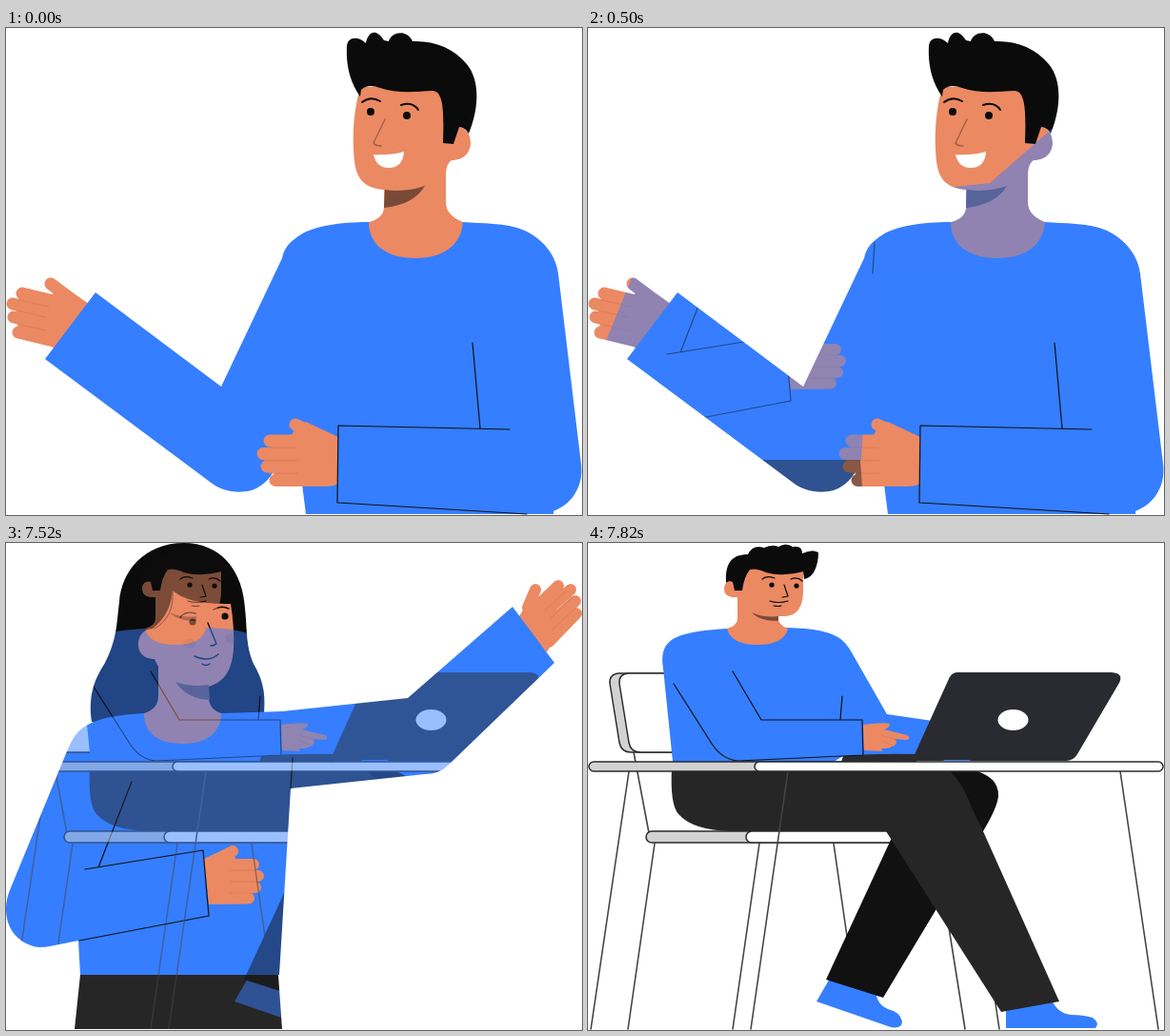
An HTML page with a canvas that plays this animation: 605x512 px, repeating every 8 s.

```html
<!DOCTYPE html>
<html lang="en">
<head>
<meta charset="utf-8">
<title>Three people</title>
<style>
html, body { margin: 0; width: 100%; height: 100%; overflow: hidden; background: #fff; }
canvas { display: block; }
</style>
</head>
<body>
<canvas id="stage" width="605" height="512"></canvas>
<script>
const W = 605, H = 512;
const SKIN = '#eb8963', CREASE = '#de7d5a', SHADE = '#794a38', BLUE = '#357eff';
const BLACK = '#0b0b0b', PANTS = '#262626', INK = '#111', GREY = '#d2d2d2', FRAME = '#444';
const stage = document.getElementById('stage').getContext('2d');
let g;

function layer(draw) {
  const c = document.createElement('canvas');
  c.width = W;
  c.height = H;
  g = c.getContext('2d');
  g.lineCap = g.lineJoin = 'round';
  draw();
  return c;
}

function fill(d, color) {
  g.fillStyle = color;
  g.fill(new Path2D(d));
}

function line(d, color = INK, width = 1.2) {
  g.strokeStyle = color;
  g.lineWidth = width;
  g.stroke(new Path2D(d));
}

function oval(x, y, rx, ry, color) {
  g.fillStyle = color;
  g.beginPath();
  g.ellipse(x, y, rx, ry, 0, 0, 7);
  g.fill();
}

function dot(x, y, r, color = BLACK) {
  oval(x, y, r, r, color);
}

// Palm, round-ended fingers and the creases between them
function hand(palm, fingers, width, creases) {
  fill(palm, SKIN);
  line(fingers, SKIN, width);
  line(creases, CREASE, 1);
}

// Outlined bar with rounded ends
function bar(x, y, w, h, color) {
  g.beginPath();
  g.roundRect(x, y, w, h, h / 2);
  g.fillStyle = color;
  g.strokeStyle = '#2b2b2b';
  g.lineWidth = 1.5;
  g.fill();
  g.stroke();
}

const waving = layer(() => {
  hand('M46 281L62 273L90 292L52 338L40 329L15 321L12 312L10 300L12 290L20 282Z',
    'M47 269L75 290M17 279L50 287M7 290L45 298M8 304L45 312M13 320L50 329', 13,
    'M14 286L45 293M12 297L42 304M15 312L42 318');
  fill('M381 204C350 204 325 208 310 217C297 225 292 232 290 242L226 377L94 278L41 348L214 477C226 487 243 490 258 486Q270 482 278 471L304 425L315 511H575V508C596 500 607 480 604 458L580 258C577 235 560 220 545 213C524 204 500 206 480 204Z', BLUE);
  fill('M372 62C366 85 364 105 365 128C366 150 369 168 397 170V188Q397 200 381 204C381 228 400 242 430 242C460 242 478 228 480 204Q462 197 462 183V152Q463 142 468 139C482 139 488 130 488 120Q487 107 477 104L460 60Z', SKIN);
  fill('M398 170Q420 173 440 166Q428 186 397 189Z', SHADE);
  fill('M372 72C361 57 357 38 358 20C358 9 370 8 378 16C380 5 388 -1 397 13L402 14C405 4 421 1 427 14C450 13 470 21 484 38C498 55 497 84 486 111Q483 105 476 104L470 122L459 121C460 90 460 66 448 66C430 67 410 69 393 63Q380 58 373 65Z', BLACK);
  dot(383, 88, 4);
  dot(421, 92, 4);
  line('M374 78Q383 71 393 77M415 81Q427 77 433 86', BLACK, 2);
  line('M398 96L386 121Q388 124 394 124', '#a45f45', 1.4);
  fill('M386 133Q403 134 418 130Q417 147 402 147Q389 147 386 133Z', '#fff');
  hand('M300 428L304 420L315 414L349 430V479Q344 482 338 482H283L277 428Z',
    'M304 417L335 432M277 434H310M270 447.5H310M274 461H310M283 475.5H320', 13,
    'M275 441H305M271 454.5H306M276 468H306');
  line('M490 331L498 421M529 422L349 418L348 499L547 511');
});

const pointing = layer(() => {
  fill('M90 188C86 160 93 143 104 126C117 100 116 85 119 62C121 30 145 0 187 0C225 0 246 28 250 60C254 90 251 106 260 127C269 143 273 155 271 180L185 200Z', BLACK);
  hand('M537 80L549 61L561 63L590 76L568 115Z',
    'M556 49L548 68M580 45L557 67M593 49L563 76M598 61L568 88M599 74L570 104', 12,
    'M588 51L567 70M596 56L572 79M599 68L574 91');
  fill('M145 179C110 181 85 186 73 202C68 209 66 215 64 219L4 365C-7 392 5 421 35 425Q42 425 46 424L76 418L78 454H287L299 258L440 243Q455 243 464 234L576 126L532 67L422 163L290 177Q260 178 226 179Z', BLUE);
  fill('M78 454H286L290 511H72Z', PANTS);
  fill('M175 50C189 61 205 64 236 64Q240 88 239 112C237 135 229 146 213 151V165Q215 176 226 179C226 198 212 211 186 211C160 211 145 200 145 179Q160 175 160 160V130L156 122C143 122 138 113 139 104Q141 91 154 90Q173 75 175 50Z', SKIN);
  line('M175 51Q177 78 156 90', INK, .8);
  oval(193, 106, 6.5, 5, '#d97a58');
  fill('M239 95Q231 95 230 100Q231 106 239 106Z', '#d97a58');
  fill('M178 146Q195 152 213 149L214 165Q190 164 178 146Z', SHADE);
  dot(196, 83, 3.6);
  dot(230, 77, 3.6);
  line('M183 78Q189 71 199 74M218 70Q226 65 234 69M212 84L221 106Q219 108 215 108M198 119Q212 126 223 117M206 127Q210 130 214 127', BLACK, 1.4);
  hand('M208 332L235 320L242 333L255 379L213 380Z',
    'M238 324L214 336M260 338H230M265 350H230M262 362H230M255 373.5H220', 12,
    'M262 344H235M264 356H235M260 368H235');
  line('M132 251L97 341M83 343L207 323L213 392L77 418M301 226L299 258');
});

const sitting = layer(() => {
  const rod = d => line(d, FRAME, 1.6);
  rod('M48 220L64 305M70 316L42 511M180 316L152 511M258 316L283 490M365 316L396 511M43 240L3 511M392 240L432 511M559 240L599 511');
  const back = (x, color) => {
    const d = `M95 137H${x + 10}Q${x} 138 ${x + 1} 148L${x + 11} 210Q${x + 13} 220 ${x + 23} 220H95Z`;
    fill(d, color);
    line(d, '#2b2b2b', 1.5);
  };
  back(22, GREY);
  back(32, '#fff');
  bar(61, 303, 270, 12, GREY);
  bar(166, 303, 165, 12, '#fff');
  fill('M255 456L240 482L318 509Q330 511 330 503Q328 493 315 490Q303 485 302 470Z', BLUE);
  fill('M439 485V510H533Q538 505 530 499Q520 496 507 496Q492 494 486 478Z', BLUE);
  fill('M375 238H402Q432 245 431 266Q430 278 415 303L310 478L250 459L318 312Z', INK);
  fill('M88 236H375Q392 248 403 278L415 303L495 482L434 493L313 303H150Q110 302 95 285Q86 275 88 236Z', PANTS);
  rod('M210 240L171 511');
  fill('M146 90C125 91 103 94 93 99C78 106 77 118 79 132L89 230H258L268 224H343L362 187L314 180L278 117Q275 111 270 105C258 92 235 90 210 89Z', BLUE);
  fill('M266 230L268 224Q300 221 345 222V230Z', '#2a2b30');
  fill('M182 186H288L290 223L155 230Z', BLUE);
  line('M90 148L130 211Q141 228 158 229L289 223L288 186H182L152 135M267 161L265 186');
  fill('M289 191Q310 188 317 190Q317 194 311 196L335 202Q340 205 335 207L322 206Q326 209 322 213L319 214Q317 216 308 216L309 219L290 218Z', SKIN);
  line('M308 202L322 206M307 207L320 213', CREASE, 1);
  fill('M388 136H550Q563 137 558 147L514 222Q510 229 502 229H340L378 145Q381 136 388 136Z', '#2a2b30');
  oval(446.5, 186, 16, 11, '#fff');
  line('M374 228.5H401', BLUE, 1);
  bar(1, 230, 300, 10, GREY);
  bar(175, 230, 429, 10, '#fff');

  fill('M168 26H226V50C226 67 220 77 205 77H200V82Q204 88 210 90Q206 107 178 107Q150 107 146 90Q157 87 157 79V57Q143 58 143 48Q143 40 152 40Z', SKIN);
  fill('M172 73Q185 79 200 77V82Q180 82 172 73Z', SHADE);
  fill('M145 42C144 22 150 12 168 12Q173 1 185 5Q194 1 200 4Q208 -1 215 4Q225 2 225 11Q236 6 242 10Q242 21 238 29Q235 36 227 38L226 30Q205 36 187 31Q177 26 170 28Q164 35 162 50L154 50L152 41Q148 39 145 42Z', BLACK);
  dot(193, 44, 2.6);
  dot(219, 45, 2.6);
  line('M183 38Q188 34 196 37M213 38Q220 35 225 40M206 44L210 56L204 57M191 61Q200 64 210 61M195 66Q200 67 203 66', BLACK, 1.2);
});

// Next figure at half strength, only inside the current one
const mix = (from, to) => layer(() => {
  g.drawImage(from, 0, 0);
  g.globalCompositeOperation = 'source-atop';
  g.globalAlpha = .5;
  g.drawImage(to, 0, 0);
});

const scenes = [
  [500, waving],
  [520, mix(waving, pointing)],
  [7520, pointing],
  [7540, mix(pointing, sitting)],
  [8000, sitting]
];

function play() {
  const t = performance.now() % 8000;
  stage.clearRect(0, 0, W, H);
  stage.drawImage(scenes.find(([end]) => t < end)[1], 0, 0);
  requestAnimationFrame(play);
}
play();
</script>
</body>
</html>
```
